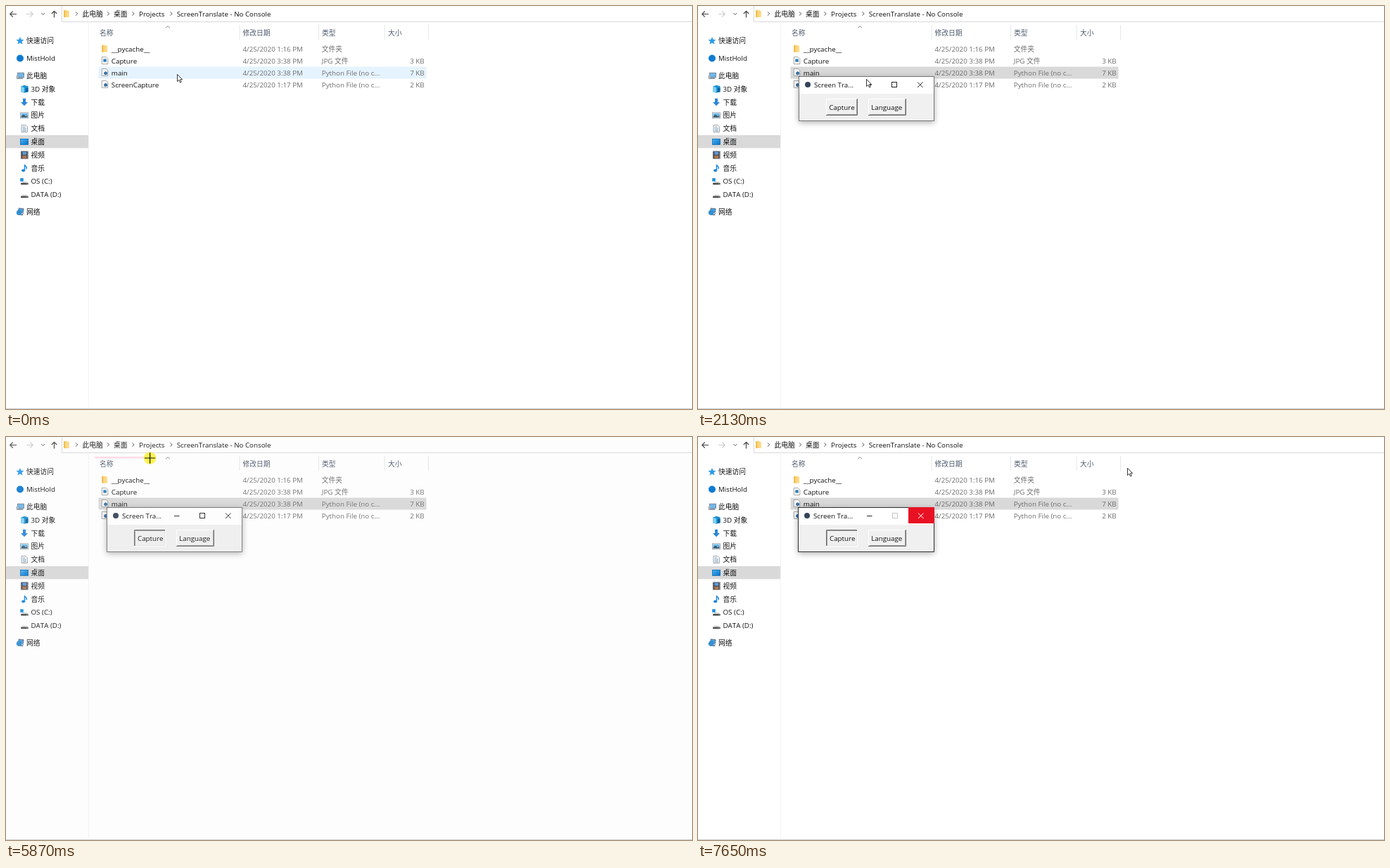
Recreate the animation shown at these times as an HTML page. Size 975 by 574 pixels, loop 7.99 s.

```html
<!DOCTYPE html>
<html lang="zh-CN">
<head>
<meta charset="utf-8">
<style>
html, body { margin: 0; width: 100%; height: 100%; overflow: hidden; background: #fff; }
svg { display: block; width: 975px; height: 574px; }
text { font: 9.78px "Open Sans", "Noto Sans CJK SC", "Noto Sans CJK", sans-serif; font-kerning: none; fill: #111; white-space: pre; }
.dim { fill: #6d6d6d; }
.head { fill: #4c5a6c; }
</style>
</head>
<body>
<svg id="stage" viewBox="0 0 975 574" xmlns="http://www.w3.org/2000/svg">
  <defs>
    <filter id="shadow" x="-10%" y="-25%" width="120%" height="160%">
      <feDropShadow dx="0" dy="2" stdDeviation="4" flood-color="#000" flood-opacity=".32"/>
    </filter>
    <linearGradient id="blue" x2="1" y2="1">
      <stop stop-color="#45b4f5"/><stop offset="1" stop-color="#0a6fc4"/>
    </linearGradient>
    <linearGradient id="gold" x2="1">
      <stop stop-color="#f7c95c"/><stop offset="1" stop-color="#ffe09a"/>
    </linearGradient>
  </defs>
  <rect width="975" height="574" fill="#fff"/>
  <rect id="row" x="131.5" y="86.5" width="466" height="17"/>
  <g id="page"></g>
  <g id="win"></g>
  <g id="veil">
    <rect width="975" height="574" fill="#e0e0e0" opacity=".08"/>
    <rect id="area" fill="rgba(95,110,255,.07)" stroke="#ffd6df"/>
  </g>
  <g id="pointer">
    <circle id="press" r="8.8" fill="#fff24a" opacity=".95"/>
    <path id="arrow" d="M.5 .3V10.6L2.9 8.4L4.5 12L6.2 11.2L4.6 7.7H7.6Z" fill="#fff" stroke="#222" stroke-width=".9"/>
    <path id="cross" d="M-7.7 0H7.7M0 -7.7V7.7" stroke="#111" stroke-width="1.2"/>
    <g id="busy" transform="translate(9 0)">
      <circle r="3.6" fill="none" stroke="#a9d9f5" stroke-width="2"/>
      <circle id="spin" r="3.6" fill="none" stroke="#1580c8" stroke-width="2" stroke-dasharray="8 15"/>
    </g>
  </g>
</svg>
<script>
const $ = id => document.getElementById(id);
const set = (id, attrs) => { for (const k in attrs) $(id).setAttribute(k, attrs[k]); };
const show = (id, on) => $(id).style.display = on ? '' : 'none';

// Text is placed by its vertical centre.
const text = (x, y, s, cls = '', more = '') =>
  `<text x="${x}" y="${y + 3.6}" class="${cls}" ${more}>${s}</text>`;
const rect = (x, y, w, h, fill, more = '') =>
  `<rect x="${x}" y="${y}" width="${w}" height="${h}" fill="${fill}" ${more}/>`;
const path = (d, stroke = '#555', more = '') =>
  `<path d="${d}" fill="none" stroke="${stroke}" ${more}/>`;
const shape = (d, fill) => `<path d="${d}" fill="${fill}"/>`;
const at = (x, y, s) => `<g transform="translate(${x} ${y})">${s}</g>`;

// Icons are drawn around their centre.
const drive = shape('M-5 1.6L-2.5 -.6H3.2L5.8 1.6Z', '#d2d2d2') + rect(-5, 1.4, 10.8, 2.3, '#4d4d4d', 'rx="1"') + rect(3.2, 2, 1.4, .9, '#8fe08f');
const sheet = shape('M-4 -5H2L4.5 -2.5V5H-4Z', '#fff') + path('M-4 -5H2L4.5 -2.5V5H-4Z', '#8d8d8d', 'stroke-width=".8"');
const icons = {
  star: shape('M0 -5.5L1.6 -1.8L5.6 -1.5L2.6 1.1L3.5 5L0 2.9L-3.5 5L-2.6 1.1L-5.6 -1.5L-1.6 -1.8Z', '#2f9be6'),
  dot: '<circle r="5" fill="#0f7bd0"/>',
  pc: rect(-3.5, -4.5, 9, 6.5, '#70b7e6', 'stroke="#66798a" stroke-width=".8"') + shape('M-5.5 4.2L-3.5 2H3L5 4.2Z', '#8b9aa8') + rect(-5.5, -1, 3, 4, '#a7b4c0'),
  cube: shape('M-5 -3.5L0 -5.5L5.5 -4V4L0 5.5L-5 4Z', '#1c8fd1') + shape('M-5 -3.5L0 -2.4V5.5L-5 4Z', '#7fd0f2') + shape('M2 -1L5.5 -2V4L2 4.8Z', '#0b65a0'),
  down: shape('M-2 -5.2H2V0H5L0 5.2L-5 0H-2Z', '#2b86d9'),
  photo: rect(-5.5, -4, 11, 8, '#fff', 'stroke="#8b9299" stroke-width=".8"') + rect(-4.5, -3, 9, 3.4, '#69b7ea') + shape('M-4.5 3V1L-1 -1L2 1L4.5 0V3Z', '#355a73'),
  doc: sheet + path('M-2.5 -2.5H1M-2.5 -.5H3M-2.5 1.5H3M-2.5 3.3H3', '#6d9bc3', 'stroke-width=".9"'),
  desk: rect(-5.5, -4, 11, 8, 'url(#blue)', 'stroke="#0d6cb5" stroke-width=".8"'),
  film: rect(-5, -5.5, 10.5, 11, '#3b3f48') + rect(-2.5, -4.7, 5.5, 4.3, '#5f9bd8') + rect(-2.5, .6, 5.5, 4.3, '#b0764c') + path('M-4 -5V5M4.3 -5V5', '#ddd', 'stroke-width="1" stroke-dasharray="1 1.2"'),
  note: '<ellipse cx="-1.4" cy="3.4" rx="2.5" ry="2" fill="#1b87dd"/>' + path('M.5 3.4V-5Q1 -2.5 3.2 -1.6Q3.6 .2 2.8 1', '#1b87dd', 'stroke-width="1.5"'),
  sys: at(0, 1, drive) + rect(-5.8, -4.5, 4.6, 4.6, '#1a92dd'),
  drive: at(0, 1, drive),
  net: rect(-2.5, -5, 7, 5.5, '#4aa3dc', 'stroke="#557" stroke-width=".7" transform="rotate(8)"') + '<circle cx="-1.3" cy="1" r="3.8" fill="#318fd0"/>' + shape('M-1 4.5L5.5 1.5L3.5 5.3Z', '#7489a0'),
  folder: shape('M-4 -5H1.5L2.5 -4H4V5H-4Z', 'url(#gold)') + rect(-4, -5, 1.8, 10, '#f0bd4c'),
  jpg: sheet + rect(-2, -2.2, 4.5, 4.2, '#2d7fbd'),
  py: sheet + '<circle cx="1.3" cy="1.2" r="2.5" fill="#3c76a8"/>'
};
const icon = (name, x, y) => at(x, y, icons[name]);

function page() {
  let s = path('M79.5 0V22.5H975', '#d9d9d9') + path('M117.5 24V572', '#f3f3f3') + path('M0 573.5H975', '#cfcfcf');
  s += path('M15 11.5H5.7M9.7 7.5L5.7 11.5L9.7 15.5', '#444', 'stroke-width="1.1"');
  s += path('M29 11.5H38.3M34.3 7.5L38.3 11.5L34.3 15.5', '#ccc', 'stroke-width="1.1"');
  s += path('M50.3 10L52.8 12.5L55.3 10', '#555');
  s += path('M68.5 16.5V7.3M64.8 11L68.5 7.3L72.2 11', '#444', 'stroke-width="1.2"');
  s += icon('folder', 86, 11);
  for (const x of [99, 144, 179.5, 233.5]) s += path(`M${x} 8.3L${x + 2.6} 11L${x} 13.7`, '#555');
  s += text(108.5, 11, '此电脑') + text(153, 11, '桌面') + text(189, 11, 'Projects') + text(242.7, 11, 'ScreenTranslate - No Console');

  for (const x of [332, 444.5, 538, 600.5]) s += path(`M${x} 27V48`, '#e6e6e6');
  s += path('M227 31.3L230 28.6L233 31.3', '#777', 'stroke-width=".9"');
  [[133, '名称'], [336.5, '修改日期'], [449, '类型'], [543, '大小']].forEach(([x, h]) => s += text(x, 38, h, 'head'));

  const py = 'Python File (no c...';
  [['folder', '__pycache__', '1:16', '文件夹', ''],
   ['jpg', 'Capture', '3:38', 'JPG 文件', '3 KB'],
   ['py', 'main', '3:38', py, '7 KB'],
   ['py', 'ScreenCapture', '1:17', py, '2 KB']
  ].forEach(([ic, name, time, type, size], i) => {
    const y = 61.5 + i * 16.85;
    s += icon(ic, 140.3, y - .7) + text(149.8, y, name) + text(336.5, y, `4/25/2020 ${time} PM`, 'dim') +
      text(448.8, y, type, 'dim') + text(594.6, y, size, 'dim', 'text-anchor="end"');
  });

  s += rect(0, 184, 117, 18.4, '#d9d9d9');
  [['star', 49.5, '快速访问'], ['dot', 74.5, 'MistHold'], ['pc', 99.7, '此电脑'], ['net', 293.2, '网络']]
    .forEach(([ic, y, name]) => s += icon(ic, 20, y) + text(29, y, name));
  ['cube 3D 对象', 'down 下载', 'photo 图片', 'doc 文档', 'desk 桌面', 'film 视频', 'note 音乐', 'sys OS (C:)', 'drive DATA (D:)']
    .forEach((item, i) => {
      const cut = item.indexOf(' '), y = 118.3 + i * 18.77;
      s += icon(item.slice(0, cut), 26, y) + text(35.5, y, item.slice(cut + 1));
    });
  return s;
}

function button(x, w, label, down) {
  const y = 132, h = 24, r = x + w, b = y + h, lift = down ? ['#696969', '#fff'] : ['#fff', '#696969'];
  return rect(x, y, w, h, '#f0f0f0') +
    path(`M${x + 1.5} ${b - 1.5}H${r - 1.5}V${y + 1}`, down ? '#e3e3e3' : '#a0a0a0') +
    path(`M${x + .5} ${b}V${y + .5}H${r}`, lift[0]) +
    path(`M${x} ${b - .5}H${r - .5}V${y}`, lift[1]) +
    (down ? path(`M${x + 1.5} ${b - 1}V${y + 1.5}H${r - 1}`, '#a0a0a0') : '') +
    text(x + (down ? 5 : 4.2), down ? 144.6 : 144, label);
}

function dialog(down, modal) {
  const x = modal ? 142.5 : 143.5, d = modal ? 1 : 0, edge = modal ? '#333' : '#777';
  return rect(x, 100.5, 335.5 - x, 63, '#f0f0f0', `stroke="${edge}" filter="url(#shadow)"`) +
    rect(x + .5, 101, 334.5 - x, 24, '#fff') +
    `<circle cx="${156 - d}" cy="112" r="4" fill="#35435a"/>` +
    text(165 - d, 112, 'Screen Tra...') +
    path(`M${239 + d} 112.5H${246.5 + d}`, '#222') +
    rect(275.5 + d, 108.5, 7, 7, 'none', `stroke="${modal ? '#c4c4c4' : '#222'}"`) +
    (modal ? rect(299, 100, 37, 23, '#e81123') : '') +
    path(`M${312 + d} 108.5L${319.5 + d} 116M${319.5 + d} 108.5L${312 + d} 116`, modal ? '#fff' : '#222') +
    button(182, 45, 'Capture', down) + button(242, 54, 'Language', false);
}

// Pointer moves: first step, last step, number of steps, end point.
const start = [243, 97], anchor = [127, 28.5];
const moves = [
  [2130, 2130, 1, 239, 104],
  [2210, 2590, 6, 211.5, 141.5],
  [4230, 4400, 3, 127, 32],
  [4720, 4780, 2, 126.6, 31],
  [4980, 5130, 3, ...anchor],
  [5690, 5870, 3, 204.6, 30],
  [5960, 6440, 7, 341, 30.7],
  [6530, 6680, 3, 411.5, 41],
  [6760, 7270, 7, 588, 154],
  [7350, 7650, 5, 610, 44]
];

function where(t) {
  let [x, y] = start;
  for (const [from, to, n, ex, ey] of moves) {
    if (t < from) break;
    const step = n < 2 ? 1 : Math.min(n, Math.floor((t - from) / (to - from) * (n - 1) + 1e-6) + 1);
    x += (ex - x) * step / n;
    y += (ey - y) * step / n;
  }
  return [x, y];
}

const within = (t, a, b) => t >= a && t < b;
const LOOP = 7990;
let look = '';

function draw(t) {
  const [x, y] = where(t);

  const state = t < 480 ? ['#e5f3ff', 'none'] : t < 2130 ? ['#cce8ff', '#99d1ff'] : ['#d9d9d9', 'none'];
  set('row', { fill: state[0], stroke: state[1] });

  const down = t >= 2820, modal = t >= 7500;
  if (look !== `${down}${modal}`) {
    look = `${down}${modal}`;
    $('win').innerHTML = dialog(down, modal);
  }
  const [scale, opacity] = t < 1660 ? [.945, .2] : t < 1740 ? [.976, .58] : t < 1810 ? [.992, .87] : [1, 1];
  show('win', t >= 1580);
  set('win', { opacity, transform: `translate(239 132) scale(${scale}) translate(-239 -132)` });

  show('veil', within(t, 3700, 7350));
  show('area', t >= 5690);
  set('area', { x: anchor[0], y: anchor[1], width: Math.max(0, x - anchor[0]), height: Math.max(0, y - anchor[1]) });

  const cross = within(t, 3610, 7350);
  set('pointer', { transform: `translate(${x} ${y})` });
  show('cross', cross);
  show('arrow', !cross);
  show('press', within(t, 170, 560) || within(t, 2820, 3050) || within(t, 5530, 7350));
  show('busy', within(t, 710, 1420));
  set('spin', { transform: `rotate(${Math.floor((t - 710) / 79) * 40})` });
}

$('page').innerHTML = page();
const begin = performance.now();
function tick() {
  draw((performance.now() - begin) % LOOP);
  requestAnimationFrame(tick);
}
tick();
</script>
</body>
</html>
```
